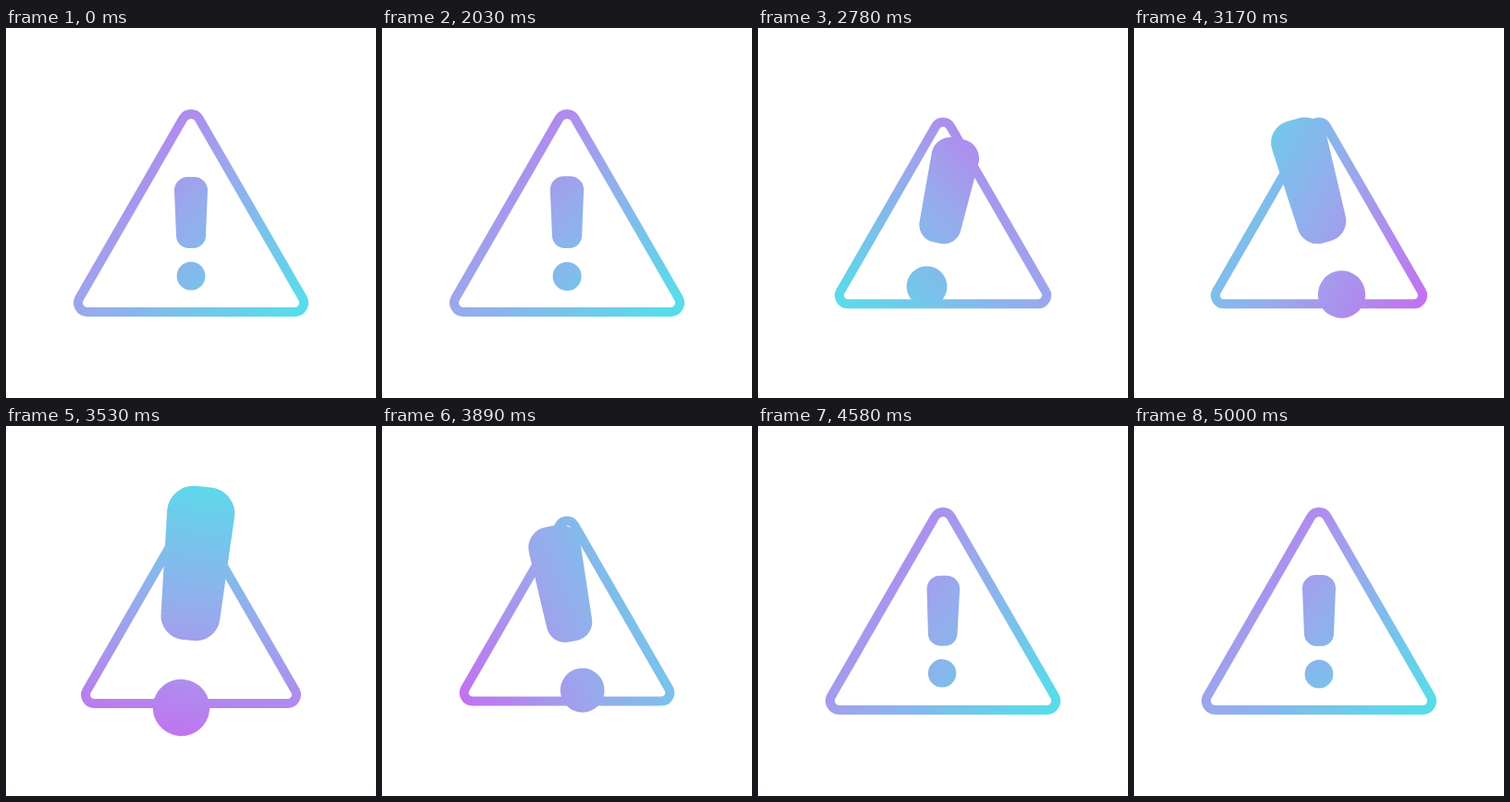
An HTML page for the animation above (5.06 s loop, 400x400 px).

```html
<!DOCTYPE html>
<html lang="en">
<head>
<meta charset="utf-8">
<title>Warning sign</title>
<style>
  html, body { margin: 0; height: 100%; overflow: hidden; background: #fff; }
  svg { display: block; width: 400px; height: 400px; }
  path, circle { vector-effect: non-scaling-stroke; stroke: #fff; }

  .frame, .tilt, .zoom, .spin { animation: 5060ms ease-in-out infinite; }
  .frame, .spin { transform-origin: 200px 200px; }
  .frame { animation-name: frame; fill: none; stroke-width: 10px; }
  .tilt { animation-name: tilt; }
  .zoom { animation-name: zoom; fill: #fff; stroke-width: 7px; }
  .spin { animation-name: spin; }

  @keyframes frame {
    0%, 39.53% { transform: scale(1); }
    55.34%, 63.24% { transform: scale(.918); }
    69.17% { transform: scale(.934); }
    76.68% { transform: scale(.911); }
    83% { transform: scale(1.122); }
    90.91%, 100% { transform: scale(1); }
  }
  @keyframes tilt {
    0%, 39.53% { transform: rotate(0deg); }
    47.43% { transform: rotate(-8deg); }
    54.94% { transform: rotate(12.4deg); }
    62.85% { transform: rotate(-15.6deg); }
    70.36% { transform: rotate(6deg); }
    77.08% { transform: rotate(-11deg); }
    84.58% { transform: rotate(4.7deg); }
    92.89%, 100% { transform: rotate(0deg); }
  }
  @keyframes zoom {
    0%, 39.53% { transform: translateY(22.25px) scale(1); }
    49.01% { transform: translateY(0px) scale(2.3); }
    55.34% { transform: translateY(10.5px) scale(1.54); }
    71.54% { transform: translateY(0px) scale(2.3); }
    83.4% { transform: translateY(21.3px) scale(.885); }
    92.89%, 100% { transform: translateY(22.25px) scale(1); }
  }
  @keyframes spin {
    0% { transform: rotate(0deg); }
    39.53% { transform: rotate(0deg); animation-timing-function: cubic-bezier(.4, .2, .5, 1); }
    98.81%, 100% { transform: rotate(360deg); }
  }
</style>
</head>
<body>
<svg viewBox="0 0 400 400">
  <defs>
    <linearGradient id="tint" gradientUnits="userSpaceOnUse" x1="94" y1="94" x2="306" y2="306">
      <stop offset="0" stop-color="#c46ff0"/>
      <stop offset=".467" stop-color="#9aa8ec"/>
      <stop offset="1" stop-color="#58dcea"/>
    </linearGradient>
    <mask id="sign" maskUnits="userSpaceOnUse" x="0" y="0" width="400" height="400">
      <g class="frame">
        <path d="M191.34 98A10 10 0 0 1 208.66 98L320.66 292A10 10 0 0 1 312 307H88A10 10 0 0 1 79.34 292Z"/>
      </g>
      <g transform="translate(200 200)">
        <g class="tilt">
          <g class="zoom">
            <path d="M-3.5 -57.75H3.5A11 11 0 0 1 14.5 -46.75L12.5 2.25A10 10 0 0 1 2.5 12.25H-2.5A10 10 0 0 1 -12.5 2.25L-14.5 -46.75A11 11 0 0 1 -3.5 -57.75Z"/>
            <circle cy="45.9" r="11.9"/>
          </g>
        </g>
      </g>
    </mask>
  </defs>
  <g mask="url(#sign)">
    <rect class="spin" x="-100" y="-100" width="600" height="600" fill="url(#tint)"/>
  </g>
</svg>
</body>
</html>
```
